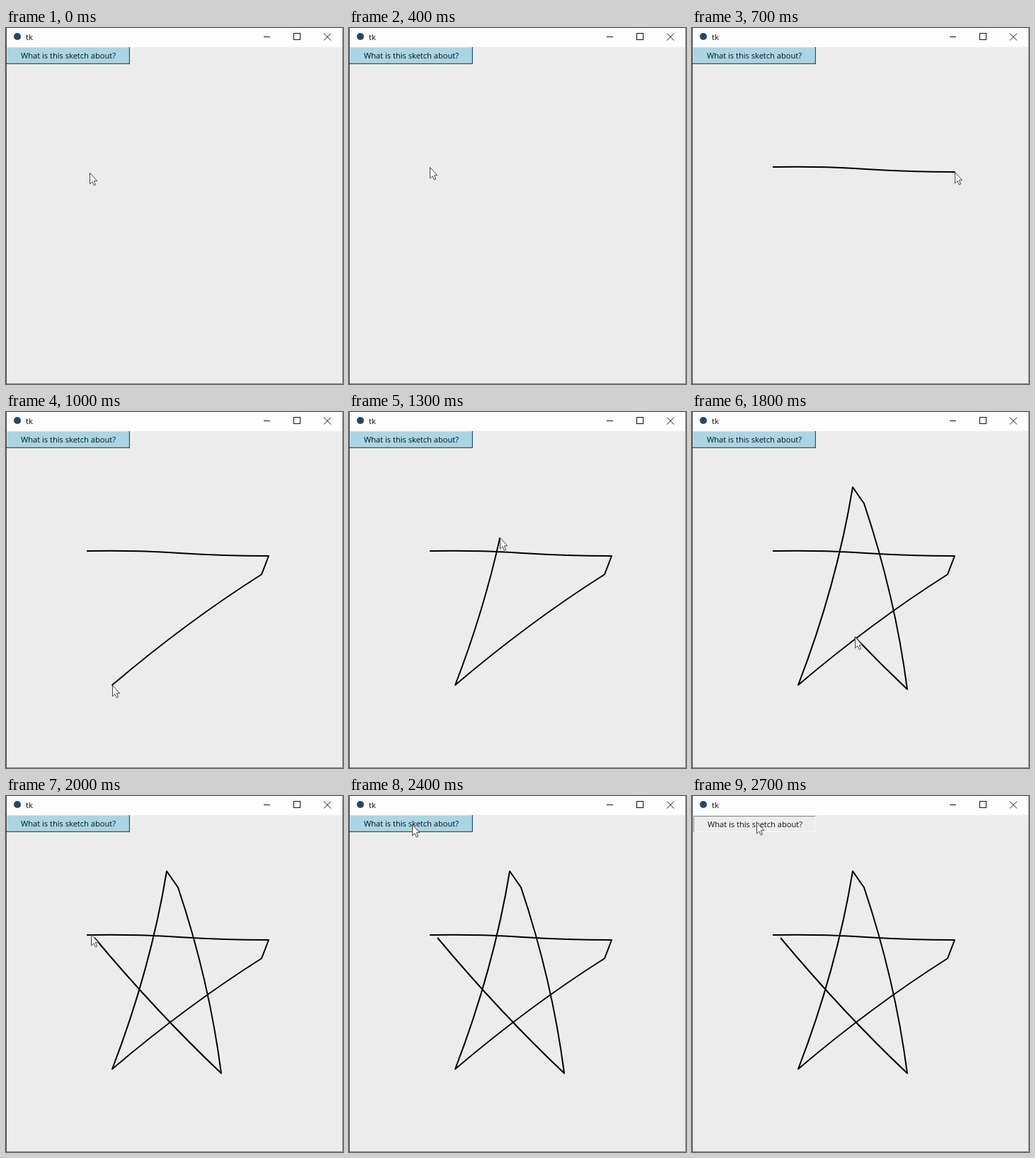
An HTML page that plays this animation: 476 px wide and 502 px high, repeating every 2800 ms.

```html
<!DOCTYPE html>
<html lang="en">
<head>
<meta charset="utf-8">
<title>Sketch pad</title>
<style>
  html, body { margin: 0; width: 100%; height: 100%; overflow: hidden; background: #ececec; }
  svg { display: block; }
  text { font-family: "Open Sans", "Noto Sans", sans-serif; fill: #111; }
  #ink { fill: none; stroke: #000; stroke-width: 2; stroke-linejoin: round; }
  .controls { fill: none; stroke: #111; }
</style>
</head>
<body>
<svg width="476" height="502" viewBox="0 0 476 502">
  <rect width="476" height="502" fill="#ececec"/>
  <rect width="476" height="27" fill="#fdfdfd"/>
  <circle cx="16" cy="12" r="5" fill="#2c4560"/>
  <text x="28" y="17" font-size="11.5">tk</text>
  <g class="controls">
    <path d="M364 12.5h9"/>
    <rect x="406.5" y="7.5" width="9" height="9"/>
    <path d="M449 7.5l10 10m0-10l-10 10"/>
  </g>

  <g id="raised">
    <rect x="1" y="27" width="174" height="24" fill="#3f5057"/>
    <rect x="1" y="27" width="172.500" height="22.500" fill="#c3e2ec"/>
    <rect x="2" y="28" width="171.500" height="21.500" fill="#aad5e4"/>
  </g>
  <g id="sunken" fill="none">
    <path d="M2.500 51V28.500H174" stroke="#858585"/>
    <path d="M3 50.500H173.500V29" stroke="#fafafa"/>
  </g>
  <text id="label" x="21" y="43" font-size="11.1">What is this sketch about?</text>

  <path id="ink"/>

  <path d="M.5 0V502" stroke="#484848"/>
  <path d="M475.500 0V501.500H1" fill="none" stroke="#858585"/>

  <path id="cursor" d="M.5 .5V16L4 12.700L6.300 18L8.600 17L6.300 11.700H10.700Z"
        fill="#fff" stroke="#444"/>
</svg>
<script>
const LOOP = 2800, STEP = 100, PRESS = 2600;
const el = id => document.getElementById(id);

// One stretch of cursor travel; the pen marks it when pen is true.
function move(start, end, from, shape, pen = true) {
  const path = document.createElementNS('http://www.w3.org/2000/svg', 'path');
  path.setAttribute('d', `M${from}${shape}`);
  return { start, end, shape, pen, path, length: path.getTotalLength() };
}

const moves = [
  move(0, 200, '118 204', 'L115 196', false),
  move(400, 700, '114 196', 'C240 194 240 203 371 203'),
  move(700, 800, '371 203', 'L361 229'),
  move(800, 1000, '361 229', 'Q255 296 150 385'),
  move(1000, 1400, '150 385', 'Q204 245 227 106'),
  move(1400, 1450, '227 106', 'L243 129'),
  move(1450, 1700, '243 129', 'Q287 260 304 391'),
  move(1700, 1950, '304 391', 'Q214 306 125 200'),
  move(1950, 2000, '125 200', 'L120 195', false),
  move(2100, 2400, '120 195', 'L89 40', false),
  move(2400, 2700, '89 40', 'L91 37', false)
];
const penMoves = moves.filter(m => m.pen);
el('ink').setAttribute('d', 'M114 196' + penMoves.map(m => m.shape).join(''));

const travelled = (m, time) =>
  m.length * Math.min(1, Math.max(0, (time - m.start) / (m.end - m.start)));
const show = (id, on) => el(id).setAttribute('visibility', on ? 'visible' : 'hidden');

function render(time) {
  const inked = penMoves.reduce((sum, m) => sum + travelled(m, time), 0);
  el('ink').setAttribute('stroke-dasharray', `${inked} 9999`);

  const current = moves.filter(m => m.start <= time).pop();
  const { x, y } = current.path.getPointAtLength(travelled(current, time));
  el('cursor').setAttribute('transform', `translate(${Math.round(x)} ${Math.round(y)})`);

  const pressed = time >= PRESS;
  show('raised', !pressed);
  show('sunken', pressed);
  el('label').setAttribute('transform', pressed ? 'translate(1 1)' : '');
}

const start = performance.now();
function tick() {
  const time = (performance.now() - start) % LOOP;
  render(Math.floor(time / STEP) * STEP);
  requestAnimationFrame(tick);
}
tick();
</script>
</body>
</html>
```
